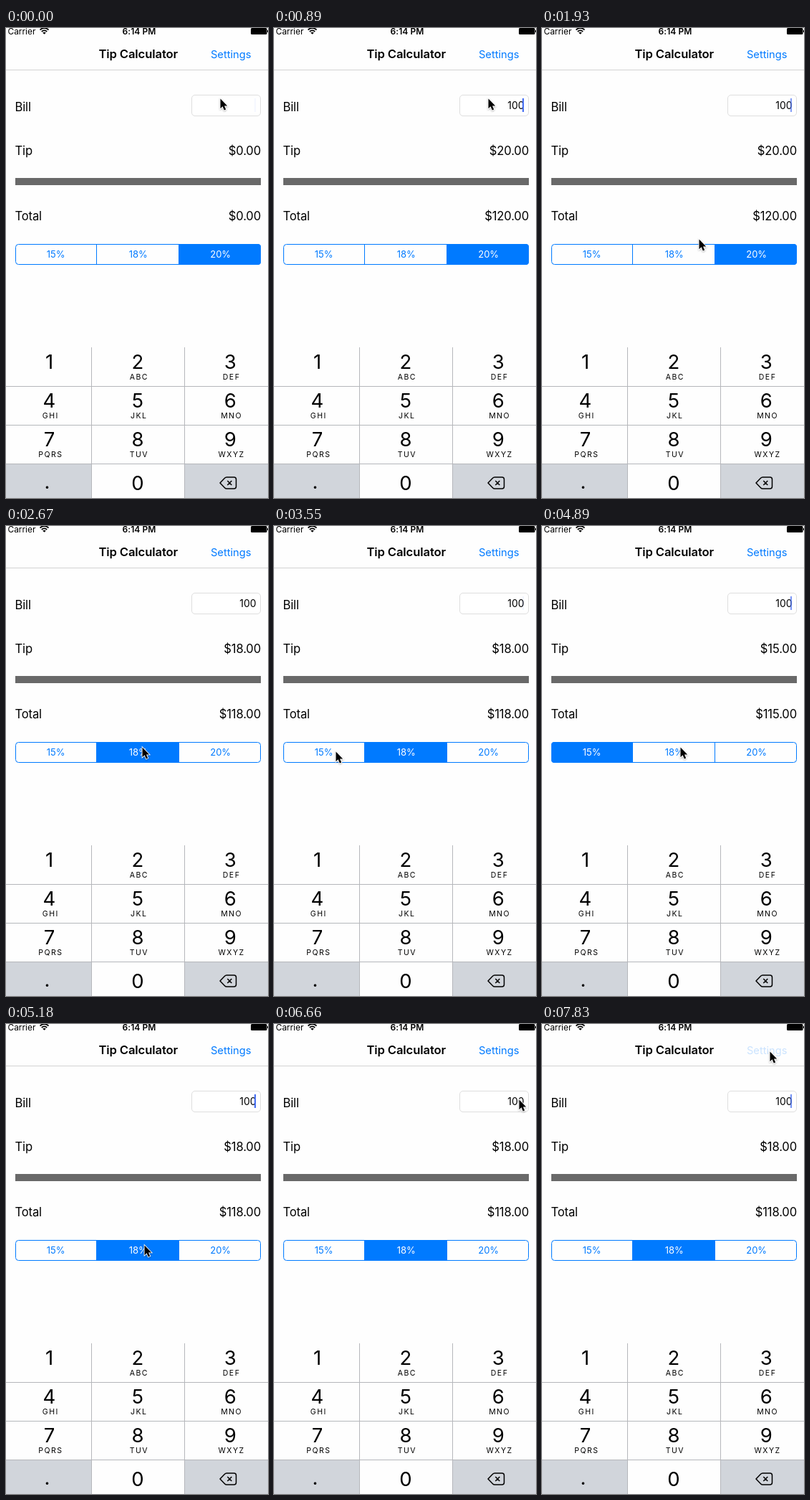
Recreate the animation shown at these times as an HTML page. Size 366 px wide and 655 px high, loop 8 s.

```html
<!DOCTYPE html>
<html lang="en">
<head>
<meta charset="utf-8">
<title>Tip Calculator</title>
<style>
html, body { margin: 0; width: 100%; height: 100%; overflow: hidden; background: #fefefe; }
svg { display: block; font-family: Inter, Roboto, sans-serif; }
.body { font-size: 16.6px; letter-spacing: -.15px; }
.end { text-anchor: end; }
.mid { text-anchor: middle; }
.digit { font-size: 27.5px; }
.letters { font-size: 10.5px; letter-spacing: 1.5px; }
.seg { font-size: 13px; }
.blue { fill: #007aff; }
.line { fill: none; stroke: #b5b7bb; }
</style>
</head>
<body>
<svg width="366" height="655" viewBox="0 0 366 655">
  <defs>
    <clipPath id="round"><rect x="13" y="301" width="343" height="29" rx="4"/></clipPath>
    <filter id="shadow" x="-50%" y="-50%" width="200%" height="200%">
      <feDropShadow dx="0" dy="1" stdDeviation="1" flood-opacity=".35"/>
    </filter>
  </defs>

  <text x="2.5" y="8.5" font-size="11.9">Carrier</text>
  <g fill="none" stroke="#000" stroke-width="1.8">
    <path d="M47.5 2.6Q53.5 -2.4 59.5 2.6M49.8 5Q53.5 1.8 57.2 5"/>
    <path d="M53.5 8.8L51.2 6.5Q53.5 4.8 55.8 6.5Z" fill="#000" stroke="none"/>
  </g>
  <text class="mid" x="186" y="8.5" font-size="12" font-weight="600" letter-spacing=".1">6:14 PM</text>
  <rect x="342" y="0" width="22.5" height="9" rx="1.5"/>
  <rect x="365" y="3" width="1" height="3"/>

  <text class="mid" x="184.7" y="42" font-size="16.6" font-weight="600" letter-spacing="-.1">Tip Calculator</text>
  <text id="settings" class="mid blue" x="314.2" y="41.5" font-size="14.7">Settings</text>
  <path d="M0 58.5H366" stroke="#d2d2d2"/>

  <g class="body">
    <text x="12.5" y="116">Bill</text>
    <text x="12.5" y="177">Tip</text>
    <text x="12.5" y="268">Total</text>
    <text id="tip" class="end" x="356" y="177"></text>
    <text id="total" class="end" x="356" y="268"></text>
  </g>
  <rect x="259.5" y="93.5" width="96" height="29" rx="4.5" fill="#fff" stroke="#dedede"/>
  <text id="bill" class="end" x="349.5" y="112.5" font-size="13.9"></text>
  <rect id="caret" x="347" y="98" width="2" height="19" fill="#426bf2"/>
  <rect x="13" y="209" width="343" height="10" fill="#696969"/>

  <g id="segments"></g>
  <g id="keys"></g>
  <path id="mouse" d="M.5 .5V14.2L3.6 11.3L5.8 16.4L8.2 15.4L6 10.4H10.2Z" stroke="#fff"
        stroke-width="1.6" paint-order="stroke" filter="url(#shadow)"/>
</svg>
<script>
const el = id => document.getElementById(id);
const label = (cls, x, y, s, extra = '') => `<text class="${cls}" x="${x}" y="${y}" ${extra}>${s}</text>`;
const LOOP = 8000, START = 447, TICK = 147.6;

// Segmented control
const rates = [15, 18, 20], edges = [13, 126, 241, 356];
el('segments').innerHTML =
  '<g clip-path="url(#round)"><rect id="chosen" class="blue" y="301" height="29"/></g>' +
  '<path d="M126.5 301V330M241.5 301V330" stroke="#007aff"/>' +
  '<rect x="13.5" y="301.5" width="342" height="28" rx="4" fill="none" stroke="#007aff"/>' +
  rates.map((r, i) => label('mid seg', 69.7 + 115 * i, 320, r + '%', `id="rate${r}"`)).join('');

// Keypad
const columns = [60.5, 184, 313.3];
const letters = ['', 'ABC', 'DEF', 'GHI', 'JKL', 'MNO', 'PQRS', 'TUV', 'WXYZ'];
el('keys').innerHTML =
  '<path d="M0 608H119V655H0ZM250 608H366V655H250Z" fill="#d1d5db"/>' +
  '<path class="line" d="M119.5 445V655M249.5 445V655M0 499.5H366M0 553.5H366M0 607.5H366"/>' +
  letters.map((s, i) => {
    const x = columns[i % 3], y = 475 + 54 * Math.floor(i / 3);
    return label('mid digit', x, y, i + 1) + label('mid letters', x + 1.8, y + 15, s);
  }).join('') +
  label('mid digit', 57.5, 641.5, '.') + label('mid digit', 184, 644, 0) +
  '<path d="M299 634L305.5 627.3Q306.7 626 308.3 626H318.5Q321.5 626 321.5 629V639Q321.5 642 318.5 642H308.3Q306.7 642 305.5 640.7Z' +
  'M309.3 631L315.3 637M315.3 631L309.3 637" fill="none" stroke="#000" stroke-width="1.5" stroke-linejoin="round"/>';

// Each entry is [tick, value...] and holds until the next one
const bills = [[-9, ''], [0, 1], [2, 10], [3, 100]];
const choices = [[-9, 20], [14, 18], [23, 15], [31, 18]];
const path = [
  [-9, 299, 98], [8, 272, 180], [9, 240, 262], [10, 219, 294], [11, 196, 306], [12, 190, 308],
  [18, 165, 310], [19, 122, 313], [20, 94, 314], [21, 86, 314],
  [27, 140, 312], [28, 193, 308],
  [39, 197, 300], [40, 243, 237], [41, 322, 130], [42, 342, 105],
  [43, 341, 100], [44, 336, 75], [45, 322, 45], [46, 318, 38]
];
const at = (list, tick) => list.filter(e => e[0] <= tick).pop().slice(1);
const money = n => '$' + n.toFixed(2);

function caretAlpha(tick) {
  if (tick < 0) return .05;
  if (tick < 7) return 1;
  const beat = (tick - 10 + 6.66) % 6.66;
  return Math.max(0, Math.min(1, .65 + beat * 2, (4.4 - beat) * 1.2));
}

function draw(now) {
  const tick = Math.floor((now % LOOP - START) / TICK);
  const [bill] = at(bills, tick), [rate] = at(choices, tick), [x, y] = at(path, tick);
  const tip = bill * rate / 100, i = rates.indexOf(rate);
  el('bill').textContent = bill;
  el('tip').textContent = money(tip);
  el('total').textContent = money(+bill + tip);
  el('caret').setAttribute('opacity', caretAlpha(tick));
  el('chosen').setAttribute('x', edges[i]);
  el('chosen').setAttribute('width', edges[i + 1] - edges[i] + (i < 2 ? 1 : 0));
  for (const r of rates) el('rate' + r).setAttribute('fill', r === rate ? '#fff' : '#007aff');
  el('settings').setAttribute('opacity', tick < 49 ? 1 : .2);
  el('mouse').setAttribute('transform', `translate(${x} ${y})`);
}

const begin = performance.now();
function loop() {
  draw(performance.now() - begin);
  requestAnimationFrame(loop);
}
loop();
</script>
</body>
</html>
```
